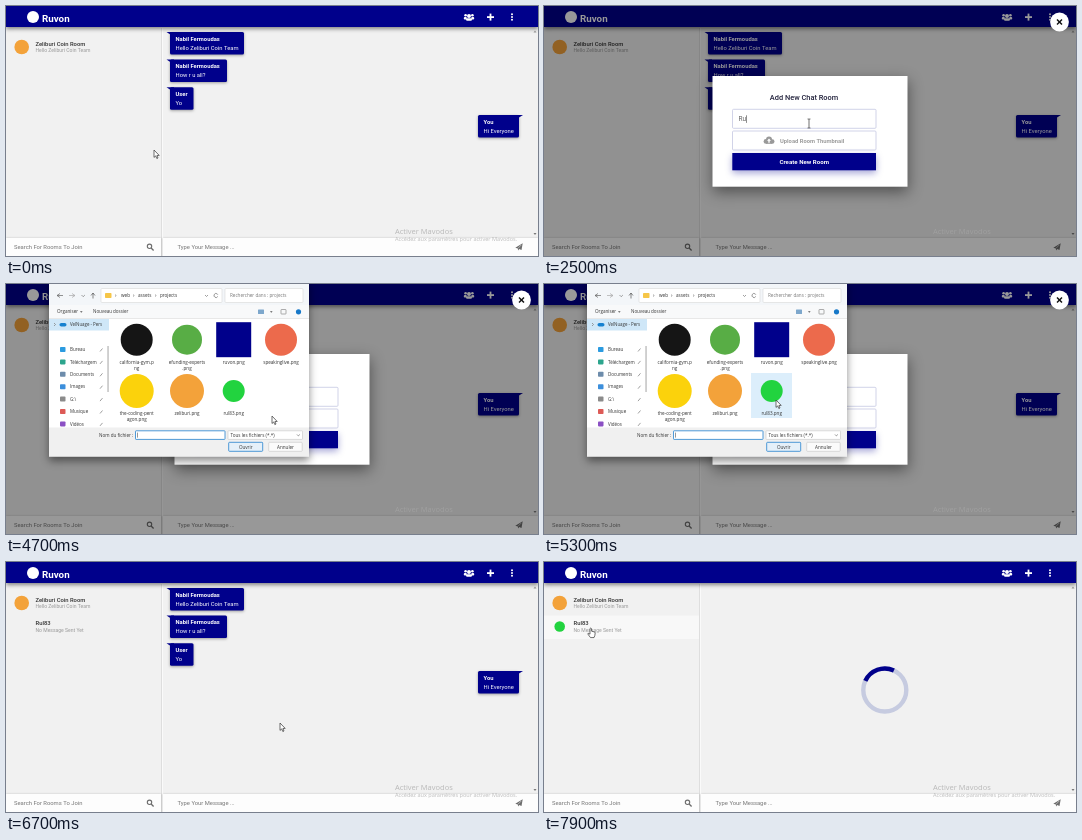
Animation, 532 px wide and 250 px high, one loop 8000 ms. Source, as an HTML page with a canvas:

```html
<!DOCTYPE html>
<html lang="en">
<head>
<meta charset="utf-8">
<title>Chat rooms</title>
<style>
html, body { margin: 0; width: 100%; height: 100%; overflow: hidden; background: #f1f1f1; }
canvas { display: block; width: 532px; height: 250px; }
</style>
</head>
<body>
<canvas id="stage"></canvas>
<script>
const W = 532, H = 250, LOOP = 8000, STEP = 100;
const NAVY = '#00008b', GREY = '#6c6c6c';
const UI = 'Roboto, sans-serif', SYS = '"Open Sans", sans-serif';
const APP = 'Ruvon', ROOM = 'Rul83';

const canvas = document.getElementById('stage');
const ctx = canvas.getContext('2d');
const dpr = window.devicePixelRatio || 1;
canvas.width = W * dpr;
canvas.height = H * dpr;

// ---- helpers ----
function text(str, x, y, size, color, weight = 400, align = 'left', family = UI) {
  ctx.font = `${weight} ${size}px ${family}`;
  ctx.fillStyle = color;
  ctx.textAlign = align;
  ctx.fillText(str, x, y);
}
function rect(x, y, w, h, color) {
  ctx.fillStyle = color;
  ctx.fillRect(x, y, w, h);
}
function round(x, y, w, h, r, fill, stroke, lw = 0.8) {
  ctx.beginPath();
  ctx.roundRect(x, y, w, h, r);
  if (fill) { ctx.fillStyle = fill; ctx.fill(); }
  if (stroke) { ctx.strokeStyle = stroke; ctx.lineWidth = lw; ctx.stroke(); }
}
function disc(x, y, r, color) {
  ctx.beginPath();
  ctx.arc(x, y, r, 0, 7);
  ctx.fillStyle = color;
  ctx.fill();
}
function arc(x, y, r, a, b, color, lw) {
  ctx.beginPath();
  ctx.arc(x, y, r, a, b);
  ctx.strokeStyle = color;
  ctx.lineWidth = lw;
  ctx.stroke();
}
function trace(points, x, y) {
  ctx.beginPath();
  for (let i = 0; i < points.length; i += 2) ctx.lineTo(x + points[i], y + points[i + 1]);
}
function poly(points, x, y, color) {
  trace(points, x, y);
  ctx.fillStyle = color;
  ctx.fill();
}
function line(points, x, y, color, lw = 0.7) {
  trace(points, x, y);
  ctx.strokeStyle = color;
  ctx.lineWidth = lw;
  ctx.stroke();
}
function shadowed(color, blur, dy, draw) {
  ctx.save();
  ctx.shadowColor = color;
  ctx.shadowBlur = blur * dpr;
  ctx.shadowOffsetY = dy * dpr;
  draw();
  ctx.restore();
}

// ---- pointer ----
// time, x, y, shape
const path = [
  [0, 148, 144, 'arrow'], [100, 187, 77, 'arrow'], [200, 187, 77, 'arrow'],
  [900, 484, 13, 'hand'], [1200, 484, 13, 'hand'], [1300, 482, 15, 'arrow'],
  [2000, 305, 58, 'arrow'], [2100, 280, 116, 'beam'], [2200, 280, 116, 'beam'],
  [2300, 282, 147, 'hand'], [2500, 265, 113, 'beam'], [3100, 265, 113, 'beam'],
  [3400, 268, 133, 'hand'], [4600, 268, 133, 'arrow'], [5300, 232, 116, 'arrow'],
  [5900, 232, 116, 'arrow'], [6200, 271, 160, 'hand'], [6500, 271, 160, 'arrow'],
  [6600, 271, 160, 'arrow'], [6700, 274, 161, 'arrow'], [7400, 57, 72, 'hand'],
  [7500, 56, 75, 'hand'], [7600, 46, 66, 'hand'], [8000, 46, 66, 'hand']
];
function pointerAt(t) {
  let i = 0;
  while (i < path.length - 2 && path[i + 1][0] <= t) i++;
  const [t0, x0, y0, shape] = path[i], [t1, x1, y1] = path[i + 1];
  const k = (t - t0) / (t1 - t0), e = k * k * (3 - 2 * k);
  return { x: x0 + (x1 - x0) * e, y: y0 + (y1 - y0) * e, shape };
}
function drawPointer({ x, y, shape }) {
  if (shape === 'beam') {
    line([-1.5, 0, 1.5, 0], x, y, '#333', 0.6);
    line([0, 0, 0, 9], x, y, '#333', 0.7);
    line([-1.5, 9, 1.5, 9], x, y, '#333', 0.6);
    return;
  }
  const outline = shape === 'hand'
    ? [0, 0.5, 0.8, 0, 1.5, 0.6, 1.6, 3.2, 4.8, 4, 5.2, 5, 4.8, 7.6, 4, 9.6, 0.5, 9.6, -2.2, 6, -1.8, 5.2, 0, 6.2]
    : [0, 0, 0, 7.4, 1.7, 5.9, 2.8, 8.5, 4, 8, 2.9, 5.5, 5.2, 5.4];
  ctx.lineJoin = 'round';
  poly(outline, x, y, '#fff');
  ctx.closePath();
  ctx.strokeStyle = '#333';
  ctx.lineWidth = 0.7;
  ctx.stroke();
}

// ---- chat page ----
function bubble(x, y, w, h, name, msg, mine) {
  shadowed('rgba(0,0,0,.35)', 3, 1, () => round(x, y, w, h, 1.5, NAVY));
  poly(mine ? [-4, 0, 4, 0, -4, 5] : [-3.5, 0, 4, 0, 4, 5], mine ? x + w : x, y, NAVY);
  text(name, x + 5.5, y + 8.6, 5.8, '#fff', 700);
  text(msg, x + 5.5, y + 17.7, 5.8, '#fff');
}
function roomRow(y, name, last, color, r) {
  if (color) disc(15.7, y, r, color);
  text(name, 29.5, y - 1.2, 5.85, '#333', 500);
  text(last, 29.5, y + 5.4, 5.05, '#999');
}
function usersIcon(x, y) {
  for (const s of [-1, 1]) {
    disc(x + s * 3.4, y - 1.7, 1.3, '#fff');
    round(x + s * 3.7 - 1.5, y, 3, 2.4, 1, '#fff');
  }
  disc(x, y - 1, 2, '#fff');
  round(x - 3, y + 1.2, 6, 2.6, 1.2, '#fff');
}
function header() {
  shadowed('rgba(0,0,0,.45)', 4, 1.5, () => rect(0, 0, W, 21, NAVY));
  disc(27, 11, 6, '#fff');
  text(APP, 36, 15.6, 9.8, '#fff', 700);
  usersIcon(463, 11);
  rect(481, 10.2, 7, 1.8, '#fff');
  rect(483.6, 7.6, 1.8, 7, '#fff');
  for (const dy of [-2.7, 0, 2.7]) disc(506, 11 + dy, 1, '#fff');
}
function footer() {
  shadowed('rgba(0,0,0,.2)', 2, 0, () => {
    rect(0, 232, 155, 20, '#fdfdfd');
    rect(157, 232, 375, 20, '#fdfdfd');
  });
  text('Search For Rooms To Join', 8, 243.2, 5.85, '#757575');
  arc(143.5, 240.3, 2.2, 0, 7, GREY, 1.1);
  line([0, 0, 2.5, 2.5], 145.1, 242, GREY, 1.3);
  text('Type Your Message ...', 171.5, 243.2, 5.85, '#757575');
  poly([0, 4.4, 7.4, 0, 6.2, 6.6, 3.9, 5.6, 2.8, 7.2, 2.5, 5.1], 509.3, 237.3, GREY);
  line([2.6, 5.1, 6, 1.6], 509.3, 237.3, '#fdfdfd', 0.5);
}
function spinner(t) {
  const mid = (250 + (t - 7900) * 0.18) * Math.PI / 180;
  arc(340.8, 128, 21.5, 0, 7, '#c6cbe0', 4.4);
  arc(340.8, 128, 21.5, mid - Math.PI / 4, mid + Math.PI / 4, NAVY, 4.4);
}
function page(t, pointer) {
  rect(0, 0, W, H, '#f1f1f1');
  rect(155, 22, 1, 228, '#dedede');
  rect(156, 22, 1, 228, '#fafafa');
  const created = t >= 6700;
  if (created && pointer.x < 155 && pointer.y > 53 && pointer.y < 77) rect(0, 53.5, 155, 23.5, '#f8f8f8');
  roomRow(41, 'Zeliburi Coin Room', 'Hello Zeliburi Coin Team', '#f3a23a', 7.3);
  if (created) roomRow(64.5, ROOM, 'No Message Sent Yet', t >= 6900 && '#22d33f', 5.3);
  if (t < 7500) {
    bubble(164, 26, 74, 22.5, 'Nabil Fermoudas', 'Hello Zeliburi Coin Team');
    bubble(164, 53.5, 57, 22.5, 'Nabil Fermoudas', 'How r u all?');
    bubble(164, 81.3, 23.5, 22.5, 'User', 'Yo');
    bubble(472, 109, 41, 22.5, 'You', 'Hi Everyone', true);
  }
  if (t >= 7800) spinner(t);
  poly([0, 2, 1.5, 0, 3, 2], 527.5, 24.5, '#999');
  poly([0, 0, 1.5, 2, 3, 0], 527.5, 227, '#777');
  header();
  footer();
}
function watermark(dim) {
  const color = dim ? 'rgba(255,255,255,.14)' : 'rgba(150,150,150,.62)';
  text('Activer Mavodos', 389, 227.6, 7.5, color, 400, 'left', SYS);
  if (!dim) text('Accédez aux paramètres pour activer Mavodos.', 389, 235.4, 5.55, color, 400, 'left', SYS);
}

// ---- new room form ----
function typed(t) {
  if (t < 2400) return '';
  return ROOM.slice(0, t < 2800 ? 1 + (t - 2400) / STEP : 3 + (t - 2800) / STEP);
}
function cloud(x, y) {
  disc(x - 3, y + 1.2, 2.4, '#999');
  disc(x, y - 0.8, 3, '#999');
  disc(x + 3.2, y + 1.3, 2.3, '#999');
  rect(x - 3, y + 0.6, 6.2, 3, '#999');
  poly([0, -1.6, 2, 0.6, 0.7, 0.6, 0.7, 2.6, -0.7, 2.6, -0.7, 0.6, -2, 0.6], x, y, '#fff');
}
function form(t) {
  rect(0, 0, W, H, 'rgba(0,0,0,.4)');
  disc(515.5, 16, 9.4, '#fff');
  line([-2.5, -2.5, 2.5, 2.5], 515.5, 16, '#111', 1.5);
  line([2.5, -2.5, -2.5, 2.5], 515.5, 16, '#111', 1.5);
  shadowed('rgba(0,0,0,.45)', 14, 5, () => rect(168.5, 70, 195, 110.7, '#fff'));
  text('Add New Chat Room', 260, 93.6, 7.4, '#22223c', 500, 'center');

  const focused = t >= 2100, edge = focused ? '#c6c8e2' : '#cfcfcf';
  round(188.5, 103.3, 143.5, 19, 1, '#fff', edge);
  const value = typed(t);
  text(value || 'Room Name', 194.5, 115.2, 6.55, value ? '#666' : '#8c8c8c');
  if (focused && t < 3100) {
    rect(194.5 + (value ? ctx.measureText(value).width : 0), 109.3, 0.6, 7.6, '#444');
  }
  round(188.5, 125, 143.5, 19, 1, '#fff', edge);
  cloud(225, 134.2);
  text('Upload Room Thumbnail', 236, 136.8, 5.8, '#9c9c9c', 700);
  shadowed('rgba(0,0,139,.35)', 7, 3, () => rect(188.3, 147, 143.7, 17.3, NAVY));
  text('Create New Room', 260.2, 158, 6.15, '#fff', 700, 'center');
}

// ---- file picker ----
const files = [
  ['#151515', 16, 'california-gym.p', 'ng'], ['#58ad45', 15, 'efunding-experts', '.png'],
  [NAVY, 0, 'ruvon.png'], ['#ec6a4c', 16, 'speakinglive.png'],
  ['#fbd20c', 17, 'the-coding-pent', 'agon.png'], ['#f3a23a', 17, 'zeliburi.png'],
  ['#22d33f', 11, 'rul83.png']
];
const places = [
  ['Bureau', '#2b9be0'], ['Téléchargem', '#2ca58d'], ['Documents', '#6d8cab'], ['Images', '#3c8fdc'],
  ['G:\\', '#8b8b8b'], ['Musique', '#dd5a56'], ['Vidéos', '#8b50c4']
];
const sys = (str, x, y, size = 4.5, color = '#333', align = 'left') => text(str, x, y, size, color, 400, align, SYS);

function picker(t, pointer) {
  ctx.save();
  if (t < 4700 || t >= 5700) ctx.globalAlpha = 0.55;
  shadowed('rgba(0,0,0,.45)', 8, 4, () => rect(43, -4, 260, 176.5, '#fff'));
  rect(43, 0, 260, 21, '#f3f6f9');
  rect(43, 21, 260, 13.5, '#f8f9fa');
  rect(43, 34, 260, 0.6, '#dcdcdc');

  // address row
  line([3, -2, 0, 0, 3, 2], 51, 11.5, '#666');
  line([0, 0, 6, 0], 51, 11.5, '#666');
  line([3, -2, 6, 0, 3, 2], 63, 11.5, '#aaa');
  line([0, 0, 6, 0], 63, 11.5, '#aaa');
  line([0, 0, 1.7, 1.7, 3.4, 0], 75.5, 11, '#777');
  line([-2, 2.5, 0, 0, 2, 2.5], 87, 9, '#555');
  line([0, 0, 0, 5.5], 87, 9, '#555');
  round(95, 4.5, 121, 14, 1, '#fff', '#d9d9d9', 0.6);
  round(99, 9, 6.5, 5, 0.7, '#f6c648');
  sys('›', 109, 13.2, 5); sys('web', 115, 13.2, 4.6);
  sys('›', 127, 13.2, 5); sys('assets', 132, 13.2, 4.6);
  sys('›', 149, 13.2, 5); sys('projects', 154, 13.2, 4.6);
  line([0, 0, 1.5, 1.5, 3, 0], 199, 11, '#777');
  arc(210, 11.5, 2, 0.5, 5.8, '#666', 0.7);
  round(219, 4.5, 78, 14, 1, '#fff', '#d9d9d9', 0.6);
  sys('Rechercher dans : projects', 224, 13.2, 4.6, '#777');

  // tool row
  sys('Organiser', 51, 29.4, 4.6);
  poly([0, 0, 2.6, 0, 1.3, 1.5], 74, 27.3, '#555');
  sys('Nouveau dossier', 87, 29.4, 4.5);
  round(252, 25.5, 6, 4.5, 0.5, '#7da7cc');
  poly([0, 0, 2.6, 0, 1.3, 1.5], 264, 27.3, '#555');
  round(275, 25.5, 5, 4.5, 0.5, null, '#777', 0.6);
  disc(292.5, 27.8, 2.6, '#1778c8');

  // places
  rect(43, 35, 60, 11.5, '#cfe7f8');
  line([0, 0, 1.5, 1.5, 0, 3], 48, 39, '#777');
  round(53.5, 39, 7, 3.6, 1.8, '#1681d0');
  sys('VelNuage - Pers', 64, 42.3, 4.4);
  places.forEach(([name, color], i) => {
    const y = 65.5 + i * 12.4;
    round(54, y - 2.5, 5.5, 5, 0.8, color);
    sys(name, 64, y + 1.7, 4.5);
    line([0, 2, 2.5, -1], 94, y, '#888', 0.8);
  });
  rect(101.3, 62, 1.5, 46, '#c2c2c2');

  // files
  const hot = t >= 4800 && pointer.x > 207 && pointer.x < 249 && pointer.y > 89;
  if (hot) rect(207, 89, 41, 45, t >= 5500 ? '#cce8ff' : '#dceefb');
  files.forEach(([color, r, a, b], i) => {
    const x = [130.7, 181, 227.7, 275][i % 4], y = i < 4 ? 55.7 : 107;
    if (r) disc(x, y, r, color);
    else rect(x - 17.5, y - 17.5, 35, 35, color);
    sys(a, x, y + 24.2, 4.6, '#333', 'center');
    if (b) sys(b, x, y + 30.2, 4.6, '#333', 'center');
  });

  // bottom
  rect(43, 143.5, 260, 29, '#f0f0f0');
  sys('Nom du fichier :', 127.3, 152.8, 4.6, '#333', 'right');
  round(129.5, 146.8, 89.5, 8.6, 0.6, '#fff', '#2582cf', 0.8);
  if (t < 5500) rect(131.5, 148.6, 0.5, 5, '#333');
  else sys('rul83.png', 131.5, 152.8, 4.6);
  round(222, 146.8, 74.5, 8.6, 0.6, '#fff', '#c4c4c4', 0.6);
  sys('Tous les fichiers (*.*)', 224.5, 152.8, 4.6);
  line([0, 0, 1.4, 1.4, 2.8, 0], 291, 150.5, '#666');
  round(222.7, 158.3, 34, 9, 0.8, '#e5f0f9', '#2582cf', 0.8);
  sys('Ouvrir', 239.7, 164.5, 4.6, '#333', 'center');
  round(262.7, 158.3, 33.5, 9, 0.8, '#fbfbfb', '#c4c4c4', 0.6);
  sys('Annuler', 279.5, 164.5, 4.6, '#333', 'center');
  ctx.restore();
}

function render(now) {
  const t = Math.floor(now % LOOP / STEP) * STEP;
  const pointer = pointerAt(t);
  const open = t >= 1200 && t < 6700;
  ctx.setTransform(dpr, 0, 0, dpr, 0, 0);
  page(t, pointer);
  if (open) form(t);
  watermark(open);
  if (t >= 4600 && t < 5800) picker(t, pointer);
  drawPointer(pointer);
}

const start = performance.now();
function tick() {
  render(performance.now() - start);
  requestAnimationFrame(tick);
}
tick();
</script>
</body>
</html>
```
